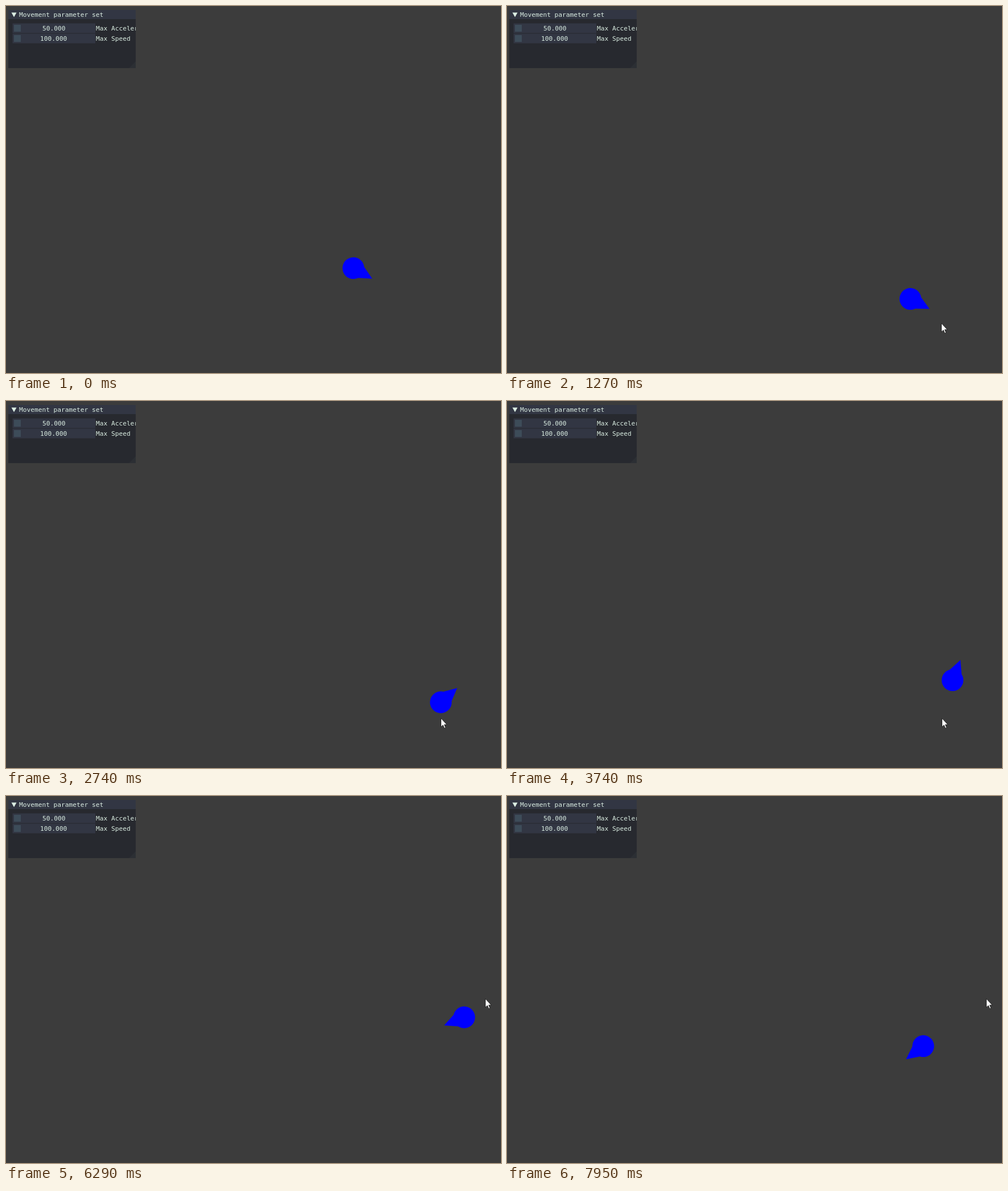
Write an HTML page that moves like this. It is 870 by 644 pixels and loops after 8000 ms.

```html
<!DOCTYPE html>
<html lang="en">
<head>
<meta charset="utf-8">
<title>Movement parameter set</title>
<style>
  html, body { margin: 0; width: 100%; height: 100%; overflow: hidden; background: #3c3c3c; }
  svg { display: block; width: 870px; height: 644px; }
  text { font: 11.2px "DejaVu Sans Mono", monospace; fill: #dbeee3; white-space: pre; }
  .frame { fill: #323643; }
  .grab { fill: #3d4c59; }
</style>
</head>
<body>
<svg viewBox="0 0 870 644">
  <clipPath id="window"><rect x="4" y="7" width="224" height="102"/></clipPath>
  <g clip-path="url(#window)">
    <rect x="4" y="7" width="224" height="102" fill="#27292f"/>
    <rect class="frame" x="4" y="7" width="224" height="16"/>
    <path d="M9.5 11.5h9l-4.5 8z" fill="#dbeee3"/>
    <text x="23" y="19">Movement parameter set</text>
    <rect class="frame" x="11.5" y="30.5" width="145.5" height="17"/>
    <rect class="grab" x="14" y="33" width="12" height="12"/>
    <text x="64" y="43">50.000</text>
    <text x="158" y="43">Max Acceleration</text>
    <rect class="frame" x="11.5" y="48.5" width="145.5" height="17"/>
    <rect class="grab" x="14" y="51" width="12" height="12"/>
    <text x="60" y="61">100.000</text>
    <text x="158" y="61">Max Speed</text>
    <path d="M228 97v12h-12z" fill="#2c2f34"/>
  </g>
  <g id="boid" fill="#00f">
    <circle r="19.1"/>
    <path d="M13 -12.3L38 0L13 12.3z"/>
  </g>
  <path id="cursor" d="M.5 .8V16L4 12.7L6.5 18.3L8.7 17.3L6.4 11.9H11z"
        fill="#fff" stroke="#1a1a1a" stroke-width=".9"/>
</svg>
<script>
const LOOP = 8, STEP = .0668;
const boid = document.getElementById('boid');
const cursor = document.getElementById('cursor');

// Points the boid steers through; t in seconds
const route = [
  { t: 0, x: 610.5, y: 460 },
  { t: .87, x: 680.5, y: 498.5 },
  { t: 1.27, x: 709, y: 514 },
  { t: 1.73, x: 734.5, y: 526.5 },
  { t: 2.54, x: 759.5, y: 531.5 },
  { t: 3.74, x: 783, y: 490 },
  { t: 4.27, x: 795.5, y: 454.7 },
  { t: 5.08, x: 809.5, y: 408.5 },
  { t: 5.89, x: 810.5, y: 388.5 },
  { t: 6.75, x: 793.5, y: 395 },
  { t: 7.95, x: 731.5, y: 439 }
];
const last = route.length - 1;

const slope = (i, axis) =>
  (route[i + 1][axis] - route[i][axis]) / (route[i + 1].t - route[i].t);

// Velocity of the parabola through a point and its neighbours
function velocity(i, axis) {
  if (i === 0) return 2 * slope(0, axis) - velocity(1, axis);
  if (i === last) return 2 * slope(last - 1, axis) - velocity(last - 1, axis);
  const before = route[i].t - route[i - 1].t;
  const after = route[i + 1].t - route[i].t;
  return (slope(i - 1, axis) * after + slope(i, axis) * before) / (before + after);
}

// Cubic Hermite position and speed along one axis
function steer(time, axis) {
  let i = 0;
  while (i < last - 1 && time >= route[i + 1].t) i++;
  const span = route[i + 1].t - route[i].t;
  const u = Math.min(1, (time - route[i].t) / span), w = 1 - u;
  const v0 = velocity(i, axis), v1 = velocity(i + 1, axis);
  return {
    at: route[i][axis] * w * w * (1 + 2 * u) + route[i + 1][axis] * u * u * (3 - 2 * u)
      + span * u * w * (v0 * w - v1 * u),
    speed: 6 * u * w * slope(i, axis) + v0 * w * (1 - 3 * u) + v1 * u * (3 * u - 2)
  };
}

const ramp = (time, from, to) => Math.min(1, Math.max(0, (time - from) / (to - from)));

function draw(time) {
  const x = steer(time, 'x'), y = steer(time, 'y');
  const heading = Math.atan2(y.speed, x.speed) * 180 / Math.PI;
  boid.setAttribute('transform', `translate(${x.at} ${y.at}) rotate(${heading})`);

  const enter = ramp(time, .2, .6), move = ramp(time, 3.87, 4.14);
  const nudge = time > 1.45 ? 1 : 0;
  const left = Math.round(825 - 62 * enter + nudge + 78 * move);
  const top = Math.round(622 - 66 * enter - 201 * move);
  cursor.setAttribute('transform', `translate(${left} ${top})`);
  cursor.setAttribute('visibility', enter > 0 ? 'visible' : 'hidden');
}

const start = performance.now();
function tick() {
  const time = (performance.now() - start) / 1000 % LOOP;
  draw(Math.floor(time / STEP) * STEP);
  requestAnimationFrame(tick);
}
tick();
</script>
</body>
</html>
```
